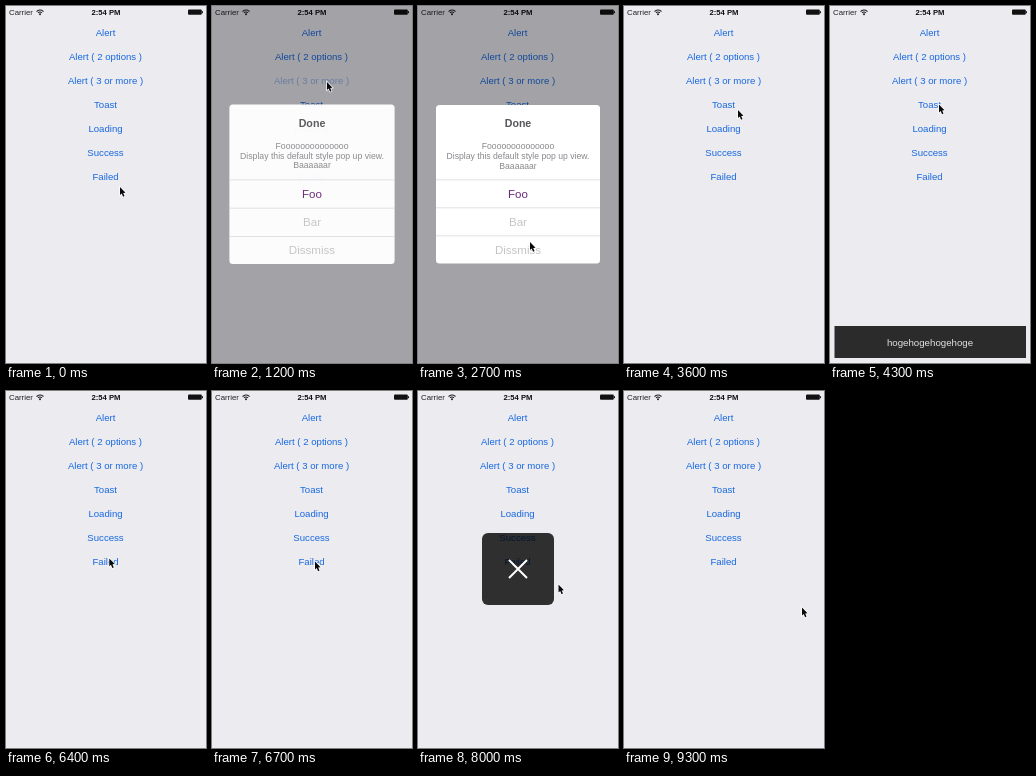
An HTML page with a canvas that plays this animation: 200 by 357 pixels, repeating every 10 s.

```html
<!DOCTYPE html>
<html lang="en">
<head>
<meta charset="utf-8">
<title>Popup demo</title>
<style>
html, body { margin: 0; width: 100%; height: 100%; overflow: hidden; background: #ecebf0; }
canvas { display: block; width: 200px; height: 357px; }
</style>
</head>
<body>
<canvas id="stage"></canvas>
<script>
const W = 200, H = 357, LOOP = 10000, STEP = 100;
const FONT = '"Liberation Sans", Arial, sans-serif';
const canvas = document.getElementById('stage');
const ctx = canvas.getContext('2d');
const ratio = window.devicePixelRatio || 1;
canvas.width = Math.round(W * ratio);
canvas.height = Math.round(H * ratio);

const MENU = ['Alert', 'Alert ( 2 options )', 'Alert ( 3 or more )',
  'Toast', 'Loading', 'Success', 'Failed'];

// time, x, y of the pointer tip
const PATH = [
  [0, 114, 181], [400, 150, 132], [800, 115, 76],
  [2100, 115, 76], [2200, 127, 160], [2300, 112, 236],
  [2900, 112, 236], [3500, 114, 104], [3600, 114, 104], [3900, 109, 98.5],
  [5700, 109, 98.5], [6500, 103, 170.5],
  [7800, 103, 170.5], [8200, 178, 216.5], [LOOP, 178, 216.5]
];

const clamp = v => Math.max(0, Math.min(1, v));
const ramp = (t, from, to) => clamp((t - from) / (to - from));
const smooth = p => p * p * (3 - 2 * p);
const easeOut = p => 1 - (1 - p) ** 3;
const fade = (t, inFrom, inTo, outFrom, outTo) =>
  smooth(ramp(t, inFrom, inTo)) * (1 - smooth(ramp(t, outFrom, outTo)));

function text(str, x, y, size, color, align = 'center', weight = 400) {
  ctx.font = `${weight} ${size}px ${FONT}`;
  ctx.textAlign = align;
  ctx.textBaseline = 'alphabetic';
  ctx.fillStyle = color;
  ctx.fillText(str, x, y);
}

function box(x, y, w, h, r, color) {
  ctx.fillStyle = color;
  ctx.beginPath();
  ctx.roundRect(x, y, w, h, r);
  ctx.fill();
}

function withAlpha(alpha, draw) {
  if (alpha <= 0) return;
  ctx.save();
  ctx.globalAlpha = alpha;
  draw();
  ctx.restore();
}

function drawStatusBar() {
  text('Carrier', 3, 9, 7.8, '#222', 'left');
  text('2:54 PM', 100, 9, 7.7, '#111', 'center', 700);
  ctx.strokeStyle = '#222';
  ctx.lineWidth = 1.1;
  for (const r of [2.6, 4.6]) {
    ctx.beginPath();
    ctx.arc(34, 8.6, r, -Math.PI * 0.77, -Math.PI * 0.23);
    ctx.stroke();
  }
  ctx.fillStyle = '#222';
  ctx.beginPath();
  ctx.arc(34, 8.2, 1, 0, Math.PI * 2);
  ctx.fill();
  box(182, 3.5, 13.8, 5.2, 1, '#111');
  box(196, 5, 1, 2.2, 0.5, '#111');
}

function drawMenu(t) {
  const pressed = {
    2: fade(t, 850, 1000, 1100, 1500),
    3: fade(t, 3850, 3950, 4000, 4300),
    6: fade(t, 6850, 6950, 7000, 7300)
  };
  MENU.forEach((label, i) => withAlpha(1 - 0.7 * (pressed[i] || 0), () =>
    text(label, 99.5, 30.2 + i * 23.9, 9.6, '#1668e0')));
}

function drawPopup() {
  box(18, 99, 164, 158.5, 3.5, '#fff');
  text('Done', 100, 121, 10.6, '#55555a', 'center', 700);
  ['F' + 'o'.repeat(14), 'Display this default style pop up view.', 'Baaaaaar']
    .forEach((line, i) => text(line, 100, 143 + i * 9.8, 8.65, '#88888c'));
  [['Foo', '#692878'], ['Bar', '#c4c4c6'], ['Dissmiss', '#c4c4c6']]
    .forEach(([label, color], i) => {
      const top = 173.5 + i * 28;
      box(18, top, 164, 0.8, 0, '#d6d6da');
      text(label, 100, top + 18.4, 11.5, color);
    });
}

function drawAlert(t) {
  const dim = fade(t, 1000, 1200, 2700, 3100);
  withAlpha(0.31 * dim, () => box(0, 0, W, H, 0, '#000'));
  withAlpha(fade(t, 1000, 1225, 2700, 3000), () => {
    const scale = 1.2 - 0.2 * easeOut(ramp(t, 1000, 1300));
    ctx.translate(100, 178.25);
    ctx.scale(scale, scale);
    ctx.translate(-100, -178.25);
    drawPopup();
  });
}

function drawToast(t) {
  withAlpha(fade(t, 3950, 4300, 5400, 5900), () => {
    box(4.5, 320, 191.5, 32, 0, '#2b2b2b');
    text('hogehogehogehoge', 100, 339.8, 9.7, '#e2e2e2');
  });
}

function drawHud(t) {
  withAlpha(fade(t, 6900, 7300, 8400, 8900), () => {
    box(64, 142, 72, 72, 6, 'rgba(0, 0, 0, 0.8)');
    ctx.strokeStyle = '#fff';
    ctx.lineWidth = 2;
    ctx.beginPath();
    ctx.moveTo(91, 169);
    ctx.lineTo(109, 187);
    ctx.moveTo(109, 169);
    ctx.lineTo(91, 187);
    ctx.stroke();
  });
}

function pointerAt(t) {
  const i = PATH.findIndex(([time]) => time > t);
  const [t0, x0, y0] = PATH[i - 1], [t1, x1, y1] = PATH[i];
  const p = smooth(ramp(t, t0, t1));
  return [x0 + (x1 - x0) * p, y0 + (y1 - y0) * p];
}

function drawPointer(t) {
  ctx.save();
  ctx.translate(...pointerAt(t));
  const outline = [[0, 0], [0, 7.9], [1.7, 6.4], [3.1, 9.7], [4.5, 9.1], [3.2, 5.9], [5.5, 5.7]];
  ctx.beginPath();
  outline.forEach(([x, y]) => ctx.lineTo(x, y));
  ctx.closePath();
  ctx.strokeStyle = '#fff';
  ctx.lineWidth = 1.4;
  ctx.stroke();
  ctx.fillStyle = '#0a0a0a';
  ctx.fill();
  ctx.restore();
}

function render(t) {
  ctx.setTransform(canvas.width / W, 0, 0, canvas.height / H, 0, 0);
  box(0, 0, W, H, 0, '#ecebf0');
  drawStatusBar();
  drawMenu(t);
  drawAlert(t);
  drawToast(t);
  drawHud(t);
  drawPointer(t);
}

const start = performance.now();
function tick() {
  const t = (performance.now() - start) % LOOP;
  render(Math.floor(t / STEP) * STEP);
  requestAnimationFrame(tick);
}
tick();
</script>
</body>
</html>
```
